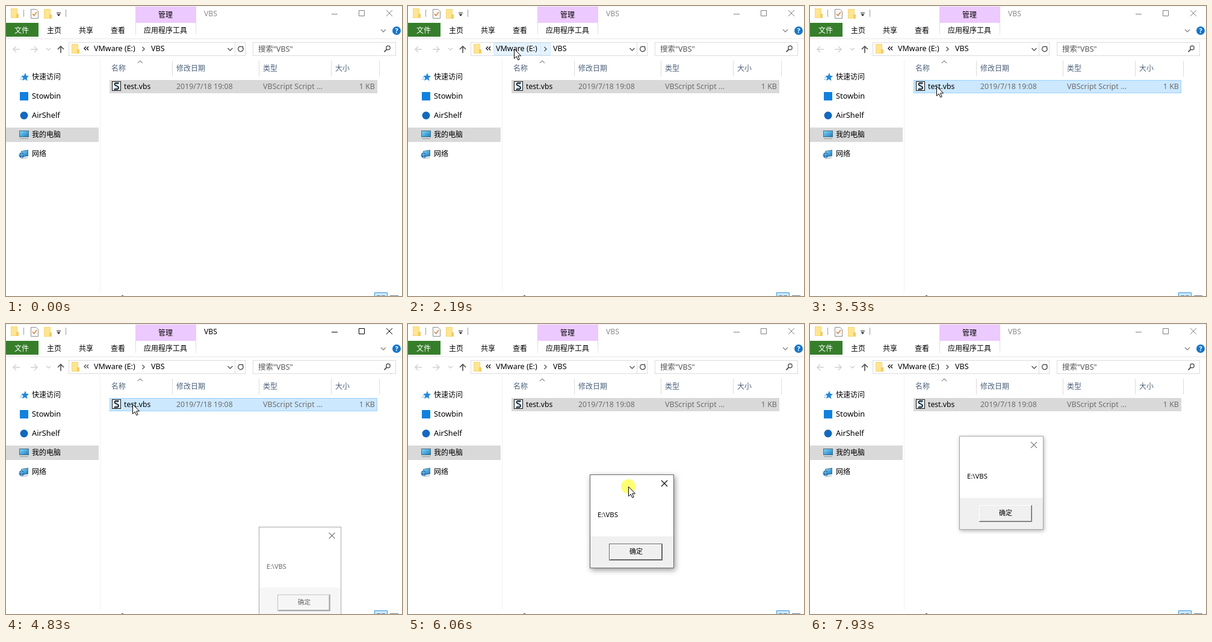
An HTML page for the animation above (8150 ms loop, 658 by 482 pixels).

```html
<!DOCTYPE html>
<html lang="zh-CN">
<head>
<meta charset="utf-8">
<title>VBS</title>
<style>
  html, body { margin: 0; width: 100%; height: 100%; overflow: hidden; background: #fff; }
  svg { display: block; }
  text { font: 12.5px "Noto Sans", "Noto Sans CJK SC", sans-serif; fill: #000; white-space: pre; }
  .zh { font-size: 12px; }
  .white { fill: #fff; }
  .head { fill: #4c607a; }
  .dim { fill: #6d6d6d; }
  .line { fill: none; stroke: #dcdcdc; }
  .ink { fill: none; stroke: #555; stroke-width: 1.4; }
  .faint { fill: none; stroke: #cfcfcf; stroke-width: 1.4; }

  #caption text { font-size: 12.2px; fill: #8a8a8a; }
  #caption path { fill: none; stroke: #808080; }
  .active #caption text { fill: #000; }
  .active #caption path { stroke: #000; }
  .active #more { stroke: #444; }

  #row { fill: #d9d9d9; stroke: #d9d9d9; }
  .over-row #row { fill: #cce8ff; stroke: #99d1ff; }
  #crumb { fill: #e5f3ff; stroke: #cce8ff; visibility: hidden; }
  .over-crumb #crumb { visibility: visible; }

  #dialog { filter: drop-shadow(2px 3px 5px rgba(0, 0, 0, .42)); }
  #dialog text { font-size: 11px; }
  #frame { fill: none; stroke: #686868; }
  #close { fill: none; stroke: #000; stroke-width: 1.1; }
  #focus { fill: none; stroke: #646464; }
  .opening #dialog { opacity: .58; filter: none; }
  .resting #dialog { filter: drop-shadow(1px 2px 3px rgba(0, 0, 0, .3)); }
  .resting #frame { stroke: #a6a6a6; }
  .resting #close { stroke: #808080; }
  .resting #focus { visibility: hidden; }

  #press { fill: #ff0; fill-opacity: .55; visibility: hidden; }
  .pressed #press { visibility: visible; }
</style>
</head>
<body>
<svg id="stage" width="658" height="482" viewBox="0 0 658 482">
  <defs>
    <linearGradient id="fade" x2="0" y2="1">
      <stop stop-color="#e3cdee"/><stop offset="1" stop-color="#e8e8e8"/>
    </linearGradient>
    <linearGradient id="screen" x2="1" y2="1">
      <stop stop-color="#7fd4f5"/><stop offset="1" stop-color="#1c7fc4"/>
    </linearGradient>
    <g id="folder">
      <path d="M0 0H11V16H0Z" fill="#f6d673"/>
      <path d="M1 1H10V15H1Z" fill="#ffe592"/>
      <path d="M9 9H13V16H9Z" fill="#f3cd62"/>
    </g>
    <g id="monitor">
      <path d="M0 0H16V11H0Z" fill="#4a7086"/>
      <path d="M1 1H15V10H1Z" fill="url(#screen)"/>
      <path d="M1 13.5H15" stroke="#8799a5"/>
    </g>
  </defs>

  <!-- title bar -->
  <rect width="658" height="482" fill="#fff"/>
  <rect x="215" y="1" width="101" height="27" fill="#ecc9ff"/>
  <path d="M0 .5H658" stroke="#f0f0f0"/>
  <use href="#folder" x="8" y="4"/>
  <use href="#folder" x="63" y="5"/>
  <path d="M29.5 6V18M99.5 6V18" stroke="#9b9b9b"/>
  <path d="M41.5 5.5H50L53.5 9V20.5H41.5Z" fill="#fafafa" stroke="#8f8f8f"/>
  <path d="M44 13L46.5 16L51 10" fill="none" stroke="#d58a3f" stroke-width="1.7"/>
  <path d="M84 11.5H91" stroke="#222"/>
  <path d="M84.5 13.5H90.5L87.5 17Z" fill="#222"/>
  <text x="253" y="19" class="zh">管理</text>
  <g id="caption">
    <text x="329" y="17">VBS</text>
    <path d="M541 13.5H551M586.5 7.5H595.5V16.5H586.5ZM632 7L642 17M642 7L632 17"/>
  </g>

  <!-- ribbon tabs -->
  <path d="M0 54.5H658" class="line" stroke-opacity=".7"/>
  <rect x="215" y="28" width="1" height="20" fill="url(#fade)"/>
  <rect x="315" y="28" width="1" height="20" fill="url(#fade)"/>
  <rect y="28" width="54" height="23" fill="#377e2b"/>
  <text x="14" y="45" class="zh white">文件</text>
  <text x="68" y="45" class="zh">主页</text>
  <text x="121" y="45" class="zh">共享</text>
  <text x="174" y="45" class="zh">查看</text>
  <text x="229" y="45" class="zh">应用程序工具</text>
  <path d="M623 39L627 43L631 39" class="ink" style="stroke:#888"/>
  <circle cx="649" cy="41" r="7" fill="#1676c6"/>
  <text x="649" y="45" class="white" text-anchor="middle" style="font-size:11px;font-weight:bold">?</text>

  <!-- navigation and address -->
  <path d="M23 72H12M17 67L12 72L17 77M41 72H52M47 67L52 72L47 77M67 70L70.5 73L74 70" class="faint"/>
  <path d="M91 78V67M86 72L91 67L96 72" class="ink" style="stroke-width:1.7"/>
  <rect x="104.5" y="60.5" width="293" height="22" class="line"/>
  <path d="M380.5 61V82" class="line"/>
  <use href="#folder" x="109" y="63"/>
  <path id="crumb" d="M142.5 61.5H220.5V81.5H142.5ZM220.5 61.5H236.5V81.5H220.5Z"/>
  <path id="more" d="M133 67.5L130 70.5L133 73.5M137 67.5L134 70.5L137 73.5" fill="none" stroke="#000" stroke-width="1.2"/>
  <text x="146" y="75">VMware (E:)</text>
  <path d="M226.5 68L230 71.5L226.5 75M368.5 70L372.5 74L376.5 70" class="ink"/>
  <text x="241" y="75">VBS</text>
  <path d="M393.5 69A4.3 4.3 0 1 1 389 67.2M389 67.5H393.5V71" class="ink"/>
  <rect x="410.5" y="60.5" width="237" height="22" class="line"/>
  <text x="419" y="76" style="fill:#555">搜索"VBS"</text>
  <circle cx="635" cy="69.5" r="3.2" class="ink"/>
  <path d="M632.7 72L628.5 76.3" class="ink" style="stroke-width:1.9"/>

  <!-- side pane -->
  <path d="M156.5 88V475" stroke="#f1f1f1"/>
  <rect y="202" width="154" height="24" fill="#d9d9d9"/>
  <path d="M32 111L33.7 115.8L38 116.5L34.5 119.5L35.5 124.5L31.5 121.8L27 124L28.5 119.5L25.5 116L30 115.8Z" fill="#2488d8"/>
  <path d="M24 118.5H27M23 121.5H27" stroke="#79b6e6"/>
  <rect x="23" y="143" width="14" height="14" fill="#1081de"/>
  <circle cx="30" cy="182" r="6.5" fill="#1269bd"/>
  <use href="#monitor" x="22" y="207"/>
  <g transform="matrix(.75 -.12 0 .95 25 241)"><use href="#monitor"/></g>
  <circle cx="26" cy="248" r="4.5" fill="#2d79b6"/>
  <path d="M22 247H30M26 244V252" stroke="#9fd0ec" stroke-width=".8"/>
  <text x="43" y="122" class="zh">快速访问</text>
  <text x="43" y="154" style="font-size:12.8px">Stowbin</text>
  <text x="43" y="186" style="font-size:12.8px">AirShelf</text>
  <text x="43" y="218" class="zh">我的电脑</text>
  <text x="43" y="250" class="zh">网络</text>

  <!-- file list -->
  <path d="M276.5 91V117M420.5 91V117M540.5 91V117M620.5 91V117" class="line"/>
  <path d="M219 95L223 91L227 95" class="ink" style="stroke-width:1"/>
  <text x="175" y="108" class="zh head">名称</text>
  <text x="283" y="108" class="zh head">修改日期</text>
  <text x="427" y="108" class="zh head">类型</text>
  <text x="547" y="108" class="zh head">大小</text>
  <rect id="row" x="172.5" y="123.5" width="444" height="21"/>
  <rect x="176.5" y="125.5" width="14" height="15" fill="#f4f7fa" stroke="#111"/>
  <path d="M187.5 128H182Q179 130 182 132L186 134Q188.5 136.5 185 138.5H179.5" fill="none" stroke="#17212c" stroke-width="2"/>
  <path d="M183 130H187M181 136.5H185M183 133L185 134" stroke="#4f8fc0"/>
  <text x="196" y="138" style="font-size:12.2px">test.vbs</text>
  <text x="283" y="138" class="dim" style="font-size:12.4px">2019/7/18 19:08</text>
  <text x="427" y="138" class="dim">VBScript Script ...</text>
  <text x="613" y="138" class="dim" text-anchor="end">1 KB</text>

  <!-- status bar -->
  <path d="M192 481.5H195" stroke="#444"/>
  <path d="M612.5 483V476.5H633.5V483" fill="#cce8ff" stroke="#3a95d6"/>
  <path d="M616 481.5H622M624 481.5H630M638 481.5H652" stroke="#6c7c88"/>

  <g id="dialog">
    <rect width="140" height="156" fill="#fff"/>
    <rect y="103" width="140" height="53" fill="#f0f0f0"/>
    <rect id="frame" x=".5" y=".5" width="139" height="155"/>
    <path id="close" d="M119 10L129 20M129 10L119 20"/>
    <text x="13" y="71" style="font-size:11.3px">E:\VBS</text>
    <path d="M33.5 142V115.5H120" fill="none" stroke="#fff"/>
    <path d="M34 141.5H119.5V116" fill="none" stroke="#a0a0a0"/>
    <path d="M33 142.5H120.5V115" fill="none" stroke="#696969"/>
    <g id="focus">
      <rect x="32.5" y="115.5" width="88" height="27"/>
      <path d="M34 141.5H119.5V117"/>
      <path d="M33.5 141V116.5H119" stroke="#fff"/>
    </g>
    <text x="66" y="132">确定</text>
  </g>

  <g id="cursor">
    <circle id="press" r="12"/>
    <path d="M.5 .5V16.3L4.2 12.9L6.8 18.7L9.2 17.6L6.7 11.9H11.6Z" fill="#fff" stroke="#000"/>
  </g>
</svg>
<script>
  const LOOP = 8150;
  const GRIP = [64, 20];
  const stage = document.getElementById('stage');
  const cursor = document.getElementById('cursor');
  const dialog = document.getElementById('dialog');

  // first step, last step, step count, end x, end y, ease-out power
  const moves = [
    [200, 420, 3, 302, 251, 1],
    [640, 1080, 5, 197, 131, 2],
    [1630, 2190, 6, 176, 71, 1.3],
    [2310, 2410, 2, 178, 72, 1],
    [2530, 2970, 5, 222, 174, 1],
    [3080, 3310, 3, 217, 139, 1],
    [3410, 3530, 2, 210, 133, 1],
    [5050, 5600, 6, 483, 356, 1.6],
    [5830, 6060, 3, 366, 270, .7],
    [6160, 6500, 4, 312, 206, 2],
    [6820, 7380, 6, 600, 520, 1]
  ];

  function pointer(t) {
    let x = 696, y = 587;
    for (const [start, end, count, toX, toY, power] of moves) {
      if (t < start) break;
      const gap = (end - start) / (count - 1);
      const step = Math.min(count, Math.floor((t - start) / gap + 1e-6) + 1);
      const part = 1 - (1 - step / count) ** power;
      x += (toX - x) * part;
      y += (toY - y) * part;
    }
    return [Math.round(x), Math.round(y)];
  }

  const within = (v, from, to) => v >= from && v < to;
  const place = (node, x, y, scale = 1) =>
    node.setAttribute('transform', `translate(${x} ${y}) scale(${scale})`);

  function draw(t) {
    const [x, y] = pointer(t);
    const opening = within(t, 4830, 4940);
    const states = {
      active: within(t, 4180, 4940),
      opening,
      resting: t >= 7930,
      pressed: within(t, 4180, 4290) || within(t, 4400, 4510) || within(t, 5720, 6600),
      'over-row': within(x, 172, 617) && within(y, 123, 145),
      'over-crumb': within(x, 142, 237) && within(y, 61, 82)
    };
    for (const name in states) stage.classList.toggle(name, states[name]);

    place(cursor, x, y);
    dialog.style.display = t < 4830 ? 'none' : '';
    const [gripX, gripY] = pointer(Math.max(5600, Math.min(t, 6600)));
    const inset = opening ? 1 : 0;
    place(dialog, gripX - GRIP[0] + inset, gripY - GRIP[1] + inset, opening ? .98 : 1);
  }

  function tick() {
    draw(performance.now() % LOOP);
    requestAnimationFrame(tick);
  }
  tick();
</script>
</body>
</html>
```
